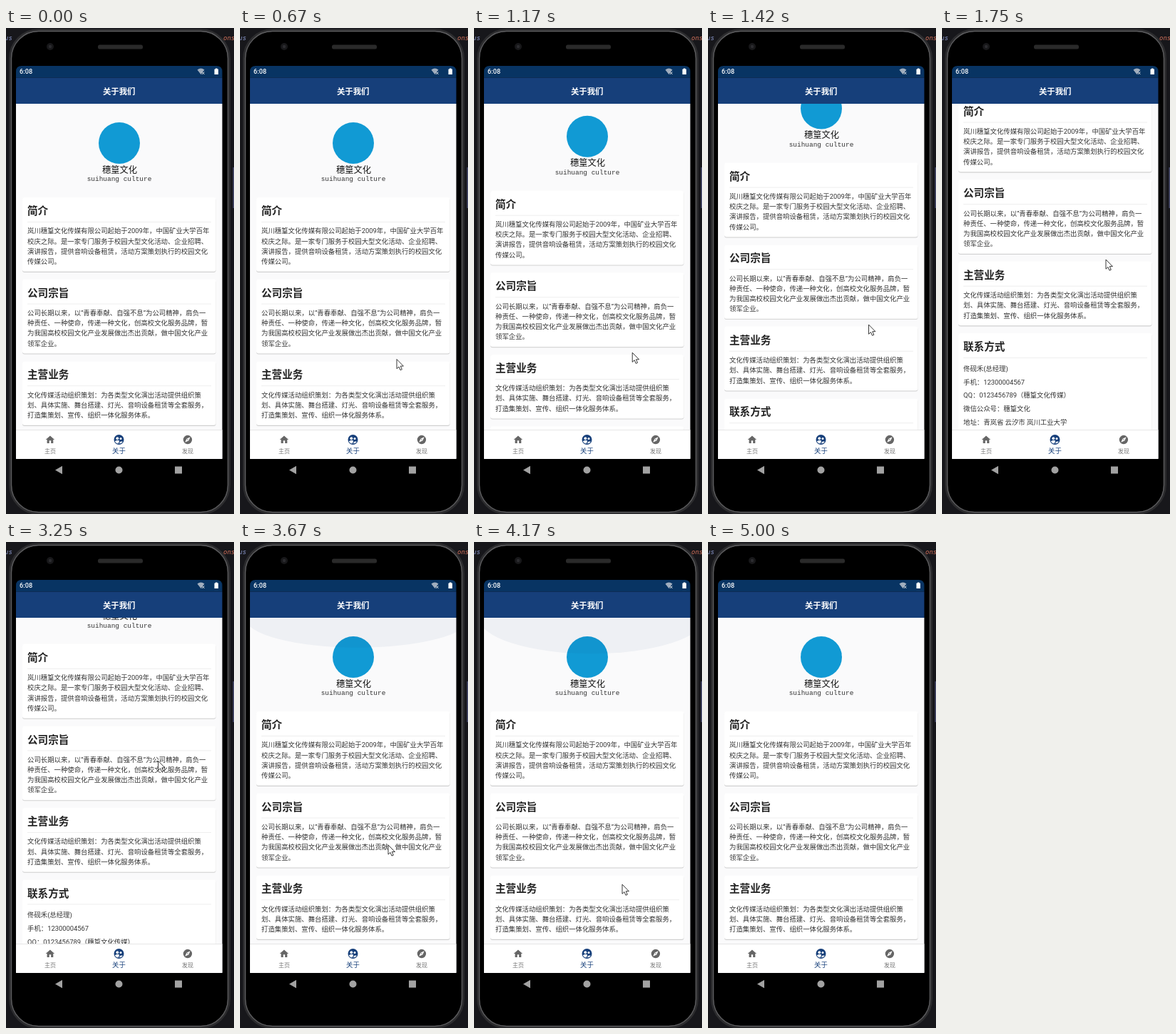
An HTML page that plays this animation: 320x680 px, repeating every 5.26 s.

```html
<!DOCTYPE html>
<html lang="zh-CN">
<head>
<meta charset="utf-8">
<title>关于我们</title>
<style>
  html, body { margin: 0; width: 100%; height: 100%; overflow: hidden; background: #17171b; }
  svg { display: block; width: 100vw; height: 100vh; }
  text { font: 9.38px Roboto, "Noto Sans CJK SC", "Noto Sans CJK", sans-serif; fill: #333; }
  .mid { text-anchor: middle; }
  .head { font-size: 14.6px; font-weight: bold; fill: #222; }
  .bar { font-size: 11.4px; font-weight: bold; fill: #fff; }
  .tab { font-size: 8px; fill: #777; }
  .code { font: italic 9px "DejaVu Sans Mono", monospace; fill: #8d9bd0; }
</style>
</head>
<body>
<svg viewBox="0 0 320 680">
  <defs>
    <clipPath id="view"><rect x="14" y="106" width="289.5" height="457"/></clipPath>
  </defs>

  <!-- Editor behind the phone -->
  <rect width="320" height="680" fill="#17171b"/>
  <text class="code" x="-2" y="16.5">us</text>
  <text class="code" x="305" y="16.5" style="fill:#d0705a">ons</text>
  <rect x="318.5" y="195" width="1.5" height="57" fill="#44486a"/>

  <!-- Phone body -->
  <rect x="6" y="3" width="307" height="676" rx="40" fill="#000" stroke="#2c2c2e" stroke-width="4"/>
  <rect x="7.5" y="4.5" width="304" height="673" rx="38" fill="none" stroke="#5c5c5e" stroke-width="1.4"/>
  <circle cx="62" cy="26" r="5" fill="#18181a"/>
  <circle cx="62" cy="26" r="2.2" fill="#2c2c30"/>
  <rect x="129" y="23.5" width="63" height="6" rx="2.5" fill="#2a2a2a"/>

  <!-- Page -->
  <rect x="14" y="106" width="289.5" height="497" fill="#fafafb"/>
  <g clip-path="url(#view)">
    <g id="page">
      <circle cx="159" cy="161" r="29" fill="#119ad4"/>
      <text class="mid" x="159.5" y="202.7" style="font-size:12.3px;font-weight:500;fill:#151515">穗篁文化</text>
      <text class="mid" x="159" y="214" style="font:9.45px 'Liberation Mono',monospace">suihuang culture</text>
    </g>
    <ellipse id="topGlow" cx="165" cy="106" rx="158" fill="#24406e"/>
    <ellipse id="endGlow" cx="180" cy="563" rx="158" fill="#24406e"/>
  </g>

  <!-- Status and title bars -->
  <path d="M14 69.5V61q0-8 8-8H295.5q8 0 8 8v8.5z" fill="#083463"/>
  <rect x="14" y="69.5" width="289.5" height="36.5" fill="#163f7a"/>
  <text x="19" y="64.3" style="font-size:9.2px;font-weight:500;fill:#fff">6:08</text>
  <path d="M268.5 58.5q5-4 10 0l-5 6.5z" fill="#a0adbd"/>
  <path d="M275 61.5l3.4 3.4m0-3.4l-3.4 3.4" stroke="#e8e8e8"/>
  <path d="M292.5 57.5h1.5v-1h2.5v1h1.5v7.5h-5.5z" fill="#fff"/>
  <text class="bar mid" x="158.7" y="92.7">关于我们</text>

  <!-- Tabs -->
  <rect x="14" y="562" width="289.5" height="1" fill="#e6e6e6"/>
  <rect x="14" y="563" width="289.5" height="39.5" fill="#fff"/>
  <g fill="#666" fill-rule="evenodd">
    <path transform="translate(54.5 568.6) scale(.62)" d="M10 20v-6h4v6h5v-8h3L12 3 2 12h3v8z"/>
    <path transform="translate(247.5 568.6) scale(.62)" d="M12 2a10 10 0 1 0 0 20 10 10 0 0 0 0-20zm2.2 12.2L6 18l3.8-8.2L18 6zM12 10.9a1.1 1.1 0 1 1 0 2.2 1.1 1.1 0 0 1 0-2.2z"/>
  </g>
  <circle cx="158.5" cy="576" r="7" fill="#163f7a"/>
  <g fill="#fff">
    <circle cx="156.3" cy="574.2" r="1.9"/>
    <circle cx="161" cy="574.6" r="1.5"/>
    <path d="M152.6 578.6q3.7-3.2 6.6-.8l-1.6 3.6q-3.4-.2-5-2.8zM159.2 581.4q0-4 4.8-2.7-1.6 2.5-4.8 2.7z"/>
  </g>
  <text class="tab mid" x="62" y="595">主页</text>
  <text class="mid" x="158.5" y="595" style="fill:#163f7a">关于</text>
  <text class="tab mid" x="255" y="595">发现</text>

  <!-- System navigation -->
  <g fill="#a2a2a2">
    <path d="M69 618.5l10-5.8v11.6z"/>
    <circle cx="158.5" cy="618.5" r="5"/>
    <rect x="237" y="613.5" width="10" height="10"/>
  </g>

  <path id="cursor" d="M0 0V13.2L3 10.5 5 15.2 7.3 14.2 5.3 9.6H9.4Z" fill="#fff" stroke="#222" stroke-width=".9"/>
</svg>

<script>
const PERIOD = 5260, STEP = 1000 / 12, MAX_SCROLL = 153;
const $ = id => document.getElementById(id);

const cards = [
  ['简介', 14.2, [
    '岚川穗篁文化传媒有限公司起始于2009年，中国矿业大学百年',
    '校庆之际。是一家专门服务于校园大型文化活动、企业招聘、',
    '演讲报告，提供音响设备租赁，活动方案策划执行的校园文化',
    '传媒公司。']],
  ['公司宗旨', 14.2, [
    '公司长期以来，以“青春奉献、自强不息”为公司精神，肩负一',
    '种责任、一种使命，传递一种文化，创高校文化服务品牌，暂',
    '为我国高校校园文化产业发展做出杰出贡献，做中国文化产业',
    '领军企业。']],
  ['主营业务', 14.2, [
    '文化传媒活动组织策划：为各类型文化演出活动提供组织策',
    '划、具体实施、舞台搭建、灯光、音响设备租赁等全套服务，',
    '打造集策划、宣传、组织一体化服务体系。']],
  ['联系方式', 18.8, [
    '佟砚禾(总经理)',
    '手机：12300004567',
    'QQ：0123456789（穗篁文化传媒）',
    '微信公众号：穗篁文化',
    '地址：青岚省 云汐市 岚川工业大学']]
];

function addCard(y, [title, leading, lines]) {
  const height = 46.8 + leading * lines.length;
  const first = y + 43.3 + leading / 2;
  const box = (dy, fill) =>
    `<rect x="23" y="${y + dy}" width="271.5" height="${height}" rx="3" fill="${fill}"/>`;
  const body = lines.map((line, i) => `<text x="30" y="${first + i * leading}">${line}</text>`);
  $('page').insertAdjacentHTML('beforeend',
    box(1.3, '#d0d0d0') + box(.4, '#e9e9e9') + box(0, '#fff') +
    `<text class="head" x="30" y="${y + 24.2}">${title}</text>` +
    `<path d="M30 ${y + 34.5}H288" stroke="#eee"/>` + body.join(''));
  return y + height + 11;
}
cards.reduce(addCard, 237);

const clamp = (v, max = 1) => Math.max(0, Math.min(max, v));
const progress = (t, from, to) => clamp((t - from) / (to - from));
const mix = (a, b, k) => a.map((v, i) => v + (b[i] - v) * k);

// Finger travel in pixels: an accelerating drag up, then a steadier one down.
const dragUp = t => 139.5 * (Math.max(0, t - 1000) / 750) ** 1.8;
const dragDown = t => 176.5 * (clamp(t - 3000, 850) / 667) ** 1.12;

function pointerAt(t) {
  if (t < 660) return mix([331, 632], [217, 457], progress(t, 0, 417));
  if (t < 2080) return [220 + 10 * progress(t, 1000, 1750), 463.5 - dragUp(t)];
  if (t < 3000) return mix([331, 325], [217, 247.5], progress(t, 2667, 2917));
  const down = [217 - 9 * progress(t, 3000, 3667), 247.5 + dragDown(t)];
  return mix(down, [331, 692], progress(t, 4167, 4583));
}

function scrollAt(t) {
  if (t > 4500) return 0;
  return clamp(clamp(dragUp(t), MAX_SCROLL) - dragDown(t), MAX_SCROLL);
}

function setGlow(id, t, from, to, peak) {
  const pull = Math.sin(Math.PI * progress(t, from, to));
  $(id).setAttribute('ry', peak * Math.sqrt(clamp(pull)));
  $(id).setAttribute('opacity', .05 * clamp(pull * 1.8));
}

function draw(now) {
  const t = Math.floor((now % PERIOD + 4) / STEP) * STEP;
  $('page').setAttribute('transform', `translate(0 ${-scrollAt(t)})`);
  $('cursor').setAttribute('transform', `translate(${pointerAt(t)})`);
  setGlow('topGlow', t, 3420, 4580, 53);
  setGlow('endGlow', t, 1800, 2500, 28);
}

const start = performance.now();
function loop() {
  draw(performance.now() - start);
  requestAnimationFrame(loop);
}
loop();
</script>
</body>
</html>
```
